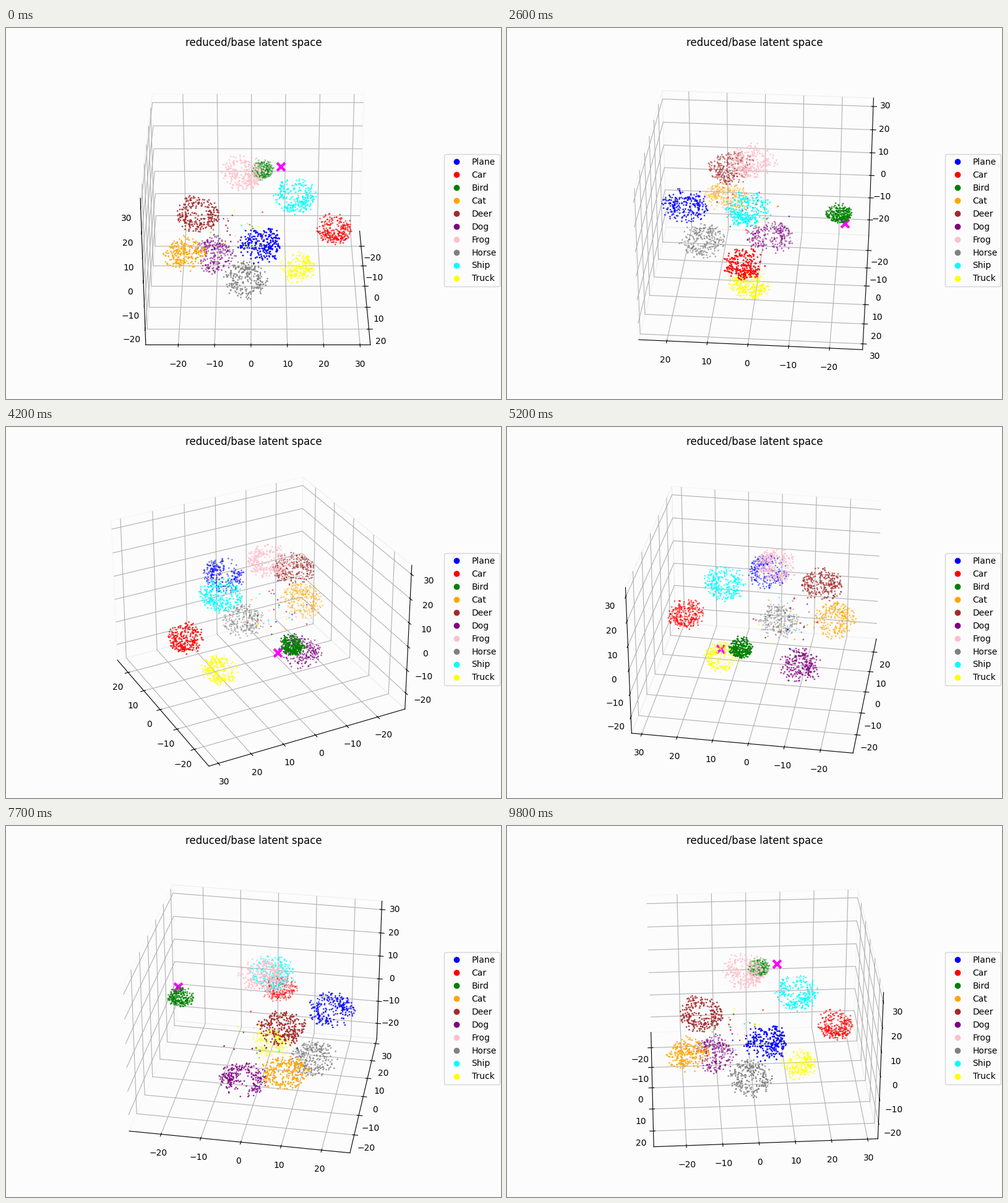
Animation, 800 px wide and 600 px high, one loop 9900 ms. Source, as a matplotlib script:

```python
import numpy as np
import matplotlib.pyplot as plt
from matplotlib.animation import FuncAnimation
from matplotlib.lines import Line2D

W, H, DPI = 800, 600, 100
FRAMES, INTERVAL = 99, 100
PAPER = "#fcfcfc"
SIDE, BOTTOM = 547.7, 15  # the square axes, in pixels
PER_CLASS, STRAYS = 250, 4

# class: colour and cluster centre
CLASSES = {
    "Plane": ("blue", (17.7, 2.7, 6.9)),
    "Car": ("red", (1.5, 23.6, -0.5)),
    "Bird": ("green", (-20.6, 3.1, 6.7)),
    "Cat": ("orange", (9.2, -18.3, -5)),
    "Deer": ("brown", (7.9, -14.8, 11.4)),
    "Dog": ("purple", (-2.4, -10.5, -15.6)),
    "Frog": ("pink", (1.3, -2.6, 23.1)),
    "Horse": ("gray", (14.2, -1.4, -11.3)),
    "Ship": ("cyan", (1.4, 12.3, 13.6)),
    "Truck": ("yellow", (1, 13.2, -17.8)),
}
RADIUS = 6.3
COMPACT = {"Bird": 3.6, "Car": 5.4, "Truck": 5.4}
MIDDLE = (2, -4.5, 0)  # stray points gather here

rng = np.random.default_rng(12)


def cluster(centre, radius):
    """A hollow ball whose surface is covered in uneven patches."""
    patches = rng.normal(size=(8, 3))
    patches /= np.linalg.norm(patches, axis=1, keepdims=True)
    rays = patches[rng.integers(8, size=PER_CLASS)]
    rays = rays + rng.normal(scale=0.6, size=rays.shape)
    rays /= np.linalg.norm(rays, axis=1, keepdims=True)
    return centre + radius * rays * rng.uniform(0.5, 1, (PER_CLASS, 1))


points, colors = [], []
for name, (color, centre) in CLASSES.items():
    points.append(cluster(centre, COMPACT.get(name, RADIUS)))
    points.append(rng.normal(MIDDLE, 4, (STRAYS, 3)))
    colors += [color] * (PER_CLASS + STRAYS)

fig = plt.figure(figsize=(W / DPI, H / DPI), dpi=DPI, facecolor=PAPER)
ax = fig.add_axes([(W - SIDE) / 2 / W, BOTTOM / H, SIDE / W, SIDE / H],
                  projection="3d")
ax.set_facecolor(PAPER)
ax.set_title("reduced/base latent space")

ax.scatter(*np.vstack(points).T, c=colors, s=1)
ax.scatter(-22.4, 8.7, 6.7, c="magenta", marker="x", s=85, linewidths=3)

ax.set_xlim(-28.05, 26.95)
ax.set_ylim(-28.95, 32.85)
ax.set_zlim(-27.05, 33.6)
for axis in (ax.xaxis, ax.yaxis, ax.zaxis):
    axis.pane.set_fill(False)

handles = [Line2D([], [], ls="", marker="o", color=color, label=name)
           for name, (color, _) in CLASSES.items()]
ax.legend(handles=handles, loc="center left", bbox_to_anchor=(1.05, 0.5),
          facecolor=PAPER)


def update(i):
    # a hair off zero so the left wall is the one shown face-on
    ax.view_init(elev=30, azim=max(360 * i / FRAMES, 0.01))
    return []


anim = FuncAnimation(fig, update, frames=FRAMES, interval=INTERVAL,
                     repeat=True, cache_frame_data=False)
plt.show()
```
